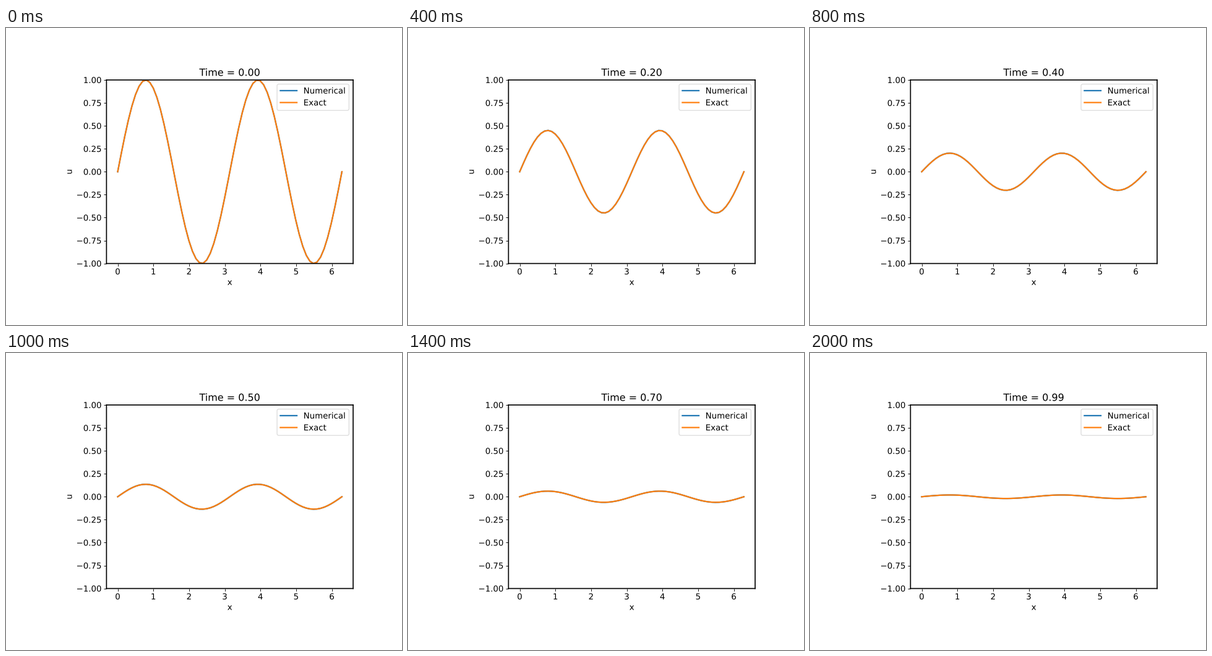
These frames come from a looping animation (640x480 px, 2.2 s). A matplotlib script:

```python
import matplotlib.pyplot as plt
import numpy as np
from matplotlib.animation import FuncAnimation
from matplotlib.patheffects import Normal
from matplotlib.text import Text

W, H, DPI = 640, 480, 80
FRAMES, INTERVAL = 11, 200
LEFT, RIGHT, TOP, BOTTOM = 162.4, 561.0, 84.0, 380.6  # plot box, px from top left
K, DT = 2, 0.01

plt.rcParams.update({
    "font.family": "DejaVu Sans",
    "font.size": 12,
    "axes.linewidth": 1.5,
    "lines.linewidth": 2,
    "text.hinting": "none",
    "path.snap": False,
})

x = np.linspace(0, 2 * np.pi, 64)
wave = np.sin(K * x)
dx = x[1] - x[0]

# Crank-Nicolson damping of one sine mode per time step
rate = (2 - 2 * np.cos(K * dx)) / dx**2
damping = (1 - rate * DT / 2) / (1 + rate * DT / 2)

fig = plt.figure(figsize=(W / DPI, H / DPI), dpi=DPI, facecolor="white")
ax = fig.add_axes([LEFT / W, 1 - BOTTOM / H, (RIGHT - LEFT) / W, (BOTTOM - TOP) / H])
numerical, = ax.plot(x, wave, color="tab:blue", label="Numerical")
exact, = ax.plot(x, wave, color="tab:orange", label="Exact")
ax.set_ylim(-1, 1)
ax.set_xlabel("x")
ax.set_ylabel("u")
ax.legend(loc="upper right")
title = ax.set_title("Time = 0.00")

# Draw text as outlines, so it keeps its sub-pixel place
for text in fig.findobj(Text):
    text.set_path_effects([Normal()])


def update(i):
    step = min(10 * i, 99)
    t = step * DT
    numerical.set_ydata(damping**step * wave)
    exact.set_ydata(np.exp(-K**2 * t) * wave)
    title.set_text(f"Time = {t:.2f}")
    return numerical, exact, title


anim = FuncAnimation(fig, update, frames=FRAMES, interval=INTERVAL,
                     repeat=True, repeat_delay=0, blit=False)
plt.show()
```
